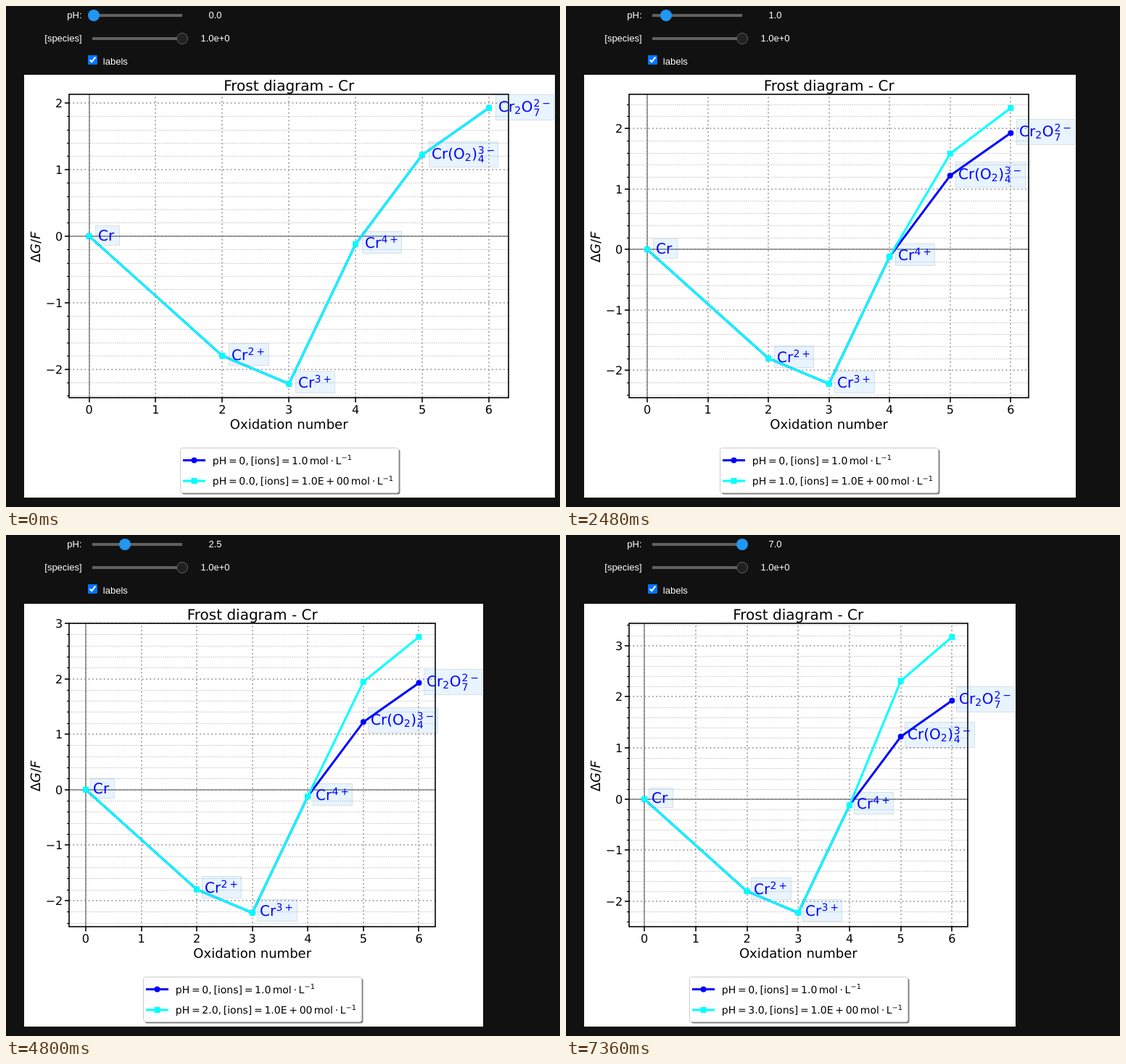
An HTML page that plays this animation: 764x692 px, repeating every 8000 ms.

```html
<!DOCTYPE html>
<html lang="en">
<head>
<meta charset="utf-8">
<title>Frost diagram</title>
<style>
html, body { margin: 0; width: 100%; height: 100%; overflow: hidden; background: #111; }
svg { display: block; font-family: "DejaVu Sans", sans-serif; }
#chart { text-rendering: geometricPrecision; }
input { position: absolute; left: 113px; top: 68px; width: 13px; height: 13px; margin: 0; pointer-events: none; }
.ui { font: 13px "Liberation Sans", Arial, sans-serif; fill: #fff; }
.mid { text-anchor: middle; }
.end { text-anchor: end; }
.major { stroke: #b0b0b0; stroke-width: 2; stroke-dasharray: 2 3.3; }
.minor { stroke: #b0b0b0; stroke-dasharray: 1 1.65; }
.zero { stroke: #808080; stroke-width: 1.5; }
.tick { stroke: #000; stroke-width: 1.6; }
.mtick { stroke: #000; stroke-width: 1.2; }
.curve { fill: none; stroke-width: 3; stroke-linejoin: round; stroke-linecap: square; }
.tag { fill: #1e90ff; fill-opacity: .1; stroke: #000; stroke-opacity: .1; }
</style>
</head>
<body>
<svg width="764" height="692" viewBox="0 0 764 692">
  <g class="ui">
    <text class="end" x="104.6" y="17">pH:</text>
    <text class="end" x="104.6" y="49">[species]</text>
    <text class="mid" x="288.5" y="49">1.0e+0</text>
    <text x="133.8" y="81">labels</text>
    <text class="mid" id="readout" x="288.5" y="17"></text>
  </g>
  <path d="M119 13H243M119 45H243" stroke="#616161" stroke-width="4"/>
  <circle id="knob" cy="13" r="8" fill="#2196f3"/>
  <circle cx="243" cy="45" r="7.5" fill="#212121" stroke="#616161"/>
  <g id="chart"></g>
</svg>
<input type="checkbox" checked aria-label="labels">
<script>
const LOOP = 8000;
const sliderSteps = [[0, 0], [560, .5], [1640, 1], [2760, 1.5], [3800, 2], [4800, 2.5], [6200, 3], [7360, 7]];
const chartSteps = [[0, 0], [1400, .5], [2480, 1], [3520, 1.5], [4560, 2], [5600, 2.5], [7120, 3]];

const LEFT = 86.95, TOP = 121.8, BOTTOM = 540.8, LOW = -2.22, HIGH = 1.925, RISE = .4141;
// oxidation number, height at pH 0, rise per pH unit
const species = [[0, 0, 0], [2, -1.8, 0], [3, LOW, 0], [4, -.12, 0], [5, 1.22, .363], [6, HIGH, RISE]];

// Runs of a formula: [text, gap before, baseline shift, size]
const ion = n => ({ w: 54.5, h: 30, up: 22.2, base: 23, runs: [['Cr'], [n, .4, -7, 14], ['+', 2.8, -7, 14]] });
const tags = [
  { w: 33, h: 27, up: 19.2, base: 21, runs: [['Cr']] },
  ion(2), ion(3), ion(4),
  { w: 95.5, h: 35, up: 23.7, base: 24, runs: [['Cr(O'], [2, 0, 3.3, 14], [')', .7], [3, .6, -7, 14], [4, -8.9, 5, 14], ['−', 2.8, -7, 14]] },
  { w: 80.5, h: 35, up: 23.4, base: 24, runs: [['Cr'], [2, 0, 3.3, 14], ['O', .7], [2, 1, -7, 14], [7, -8.9, 6, 14], ['−', 2.8, -7, 14]] }
];

const $ = id => document.getElementById(id);
const snap = v => Math.round(v) + .5;
const line = (cls, x1, y1, x2, y2) => `<path class="${cls}" d="M${x1} ${y1}L${x2} ${y2}"/>`;
const text = (x, y, size, body, extra = '') => `<text x="${x}" y="${y}" font-size="${size}" ${extra}>${body}</text>`;

function formula(x, y, size, runs, extra) {
  let last = 0;
  const body = runs.map(([s, gap = 0, shift = 0, fs = size]) => {
    const dy = shift - last;
    last = shift;
    return `<tspan dx="${gap}" dy="${dy}" font-size="${fs}">${s}</tspan>`;
  }).join('');
  return text(x, y, size, body, extra);
}

const dot = (x, y) => `<circle cx="${x}" cy="${y}" r="4" fill="#00f"/>`;
const box = (x, y) => `<rect x="${x - 4}" y="${y - 4}" width="8" height="8" fill="#0ff"/>`;

function curve(points, color, marker) {
  return `<polyline class="curve" stroke="${color}" points="${points.join(' ')}"/>` +
    points.map(p => marker(...p)).join('');
}

function legend(mid, pH) {
  const x = Math.floor(mid - 150) + .5, g = 2.7;
  const frame = (d, style) => `<rect x="${x + d}" y="${610.5 + d}" width="301" height="62" rx="3" ${style}/>`;
  const row = (y, color, marker, ph, conc) =>
    curve([[x + 5, y], [x + 33, y]], color, () => '') + marker(x + 19, y) +
    formula(x + 44.3, y + 5, 14, [['pH'], ['=', g], [ph + ',', g], ['[ions]', g], ['=', g], ...conc,
      ['mol', 2.3], ['·', g], ['L', g], ['−1', 0, -5.3, 9.8]]);
  return frame(2, 'fill="#000" fill-opacity=".5"') + frame(0, 'fill="#fff" stroke="#ccc"') +
    row(627.5, '#00f', dot, '0', [['1.0', g]]) +
    row(656, '#0ff', box, pH.toFixed(1), [['1.0E', g], ['+', g], ['00', g]]);
}

function drawChart(pH) {
  const high = HIGH + RISE * pH;
  const unit = (BOTTOM - TOP) / 1.1 / (high - LOW);
  const pad = (high - LOW) * .05;
  const X = v => LEFT + (v + .3) * unit;
  const Y = v => BOTTOM - (v - LOW + pad) * unit;
  const right = Math.round(X(6.3)), mid = (LEFT + X(6.3)) / 2;
  const edge = Math.floor(X(6.15) + 77.86);
  const x0 = Math.round(X(0)), y0 = Math.round(Y(0));
  let grid = '', ticks = '';

  for (let n = 0; n <= 6; n++) {
    const x = Math.round(X(n));
    grid += line('major', x, 541, x, 122);
    ticks += line('tick', x, 541, x, 547.5) + text(X(n), 563, 16, n, 'class="mid"');
  }
  for (let k = Math.ceil((LOW - pad) * 5); k / 5 <= high + pad; k++) {
    const y = Y(k / 5), row = Math.round(y);
    if (k % 5) {
      grid += line('minor', 87, snap(y), right, snap(y));
      ticks += line('mtick', 84, snap(y), 87, snap(y));
    } else {
      grid += line('major', 87, row, right, row);
      ticks += line('tick', 81, row, 87, row) +
        text(78.3, row + 6, 16, String(k / 5).replace('-', '−'), 'class="end"');
    }
  }
  grid += line('zero', 87, y0, right, y0) + line('zero', x0, 541, x0, 122);

  const points = ph => species.map(([n, e, rise]) => [X(n), Y(e + rise * ph)]);
  const labels = points(0).map(([px, py], i) => {
    const t = tags[i], tx = px + .15 * unit;
    const x = snap(tx - 5), y = snap(py + .05 * unit - t.up);
    return `<rect class="tag" x="${x}" y="${y}" width="${snap(tx - 5 + t.w) - x}" height="${t.h}"/>` +
      formula(Math.round(tx) - 1, y + t.base - .5, 20, t.runs, 'fill="#00f"');
  }).join('');

  return `<rect x="25" y="95" width="${edge - 25}" height="584" fill="#fff"/>` + grid +
    curve(points(0), '#00f', dot) + curve(points(pH), '#0ff', box) + ticks +
    `<rect x="87" y="122" width="${right - 87}" height="419" fill="none" class="tick"/>` + labels +
    text(mid, 117, 20, 'Frost diagram - Cr', 'class="mid"') +
    text(mid, 584, 18, 'Oxidation number', 'class="mid"') +
    text(0, 0, 18, 'Δ<tspan font-style="italic">G</tspan>/<tspan font-style="italic">F</tspan>',
      'transform="translate(47 354.3) rotate(-90)"') +
    legend(mid, pH);
}

const valueAt = (steps, t) => steps.filter(([at]) => at <= t).pop()[1];
let shownPH, shownSlider;

function render(t) {
  const slider = valueAt(sliderSteps, t), pH = valueAt(chartSteps, t);
  if (slider !== shownSlider) {
    shownSlider = slider;
    $('knob').setAttribute('cx', Math.floor(121.2 + slider * 122 / 7));
    $('readout').textContent = slider.toFixed(1);
  }
  if (pH !== shownPH) {
    shownPH = pH;
    $('chart').innerHTML = drawChart(pH);
  }
}

const start = performance.now();
function tick() {
  render((performance.now() - start) % LOOP);
  requestAnimationFrame(tick);
}
tick();
</script>
</body>
</html>
```
